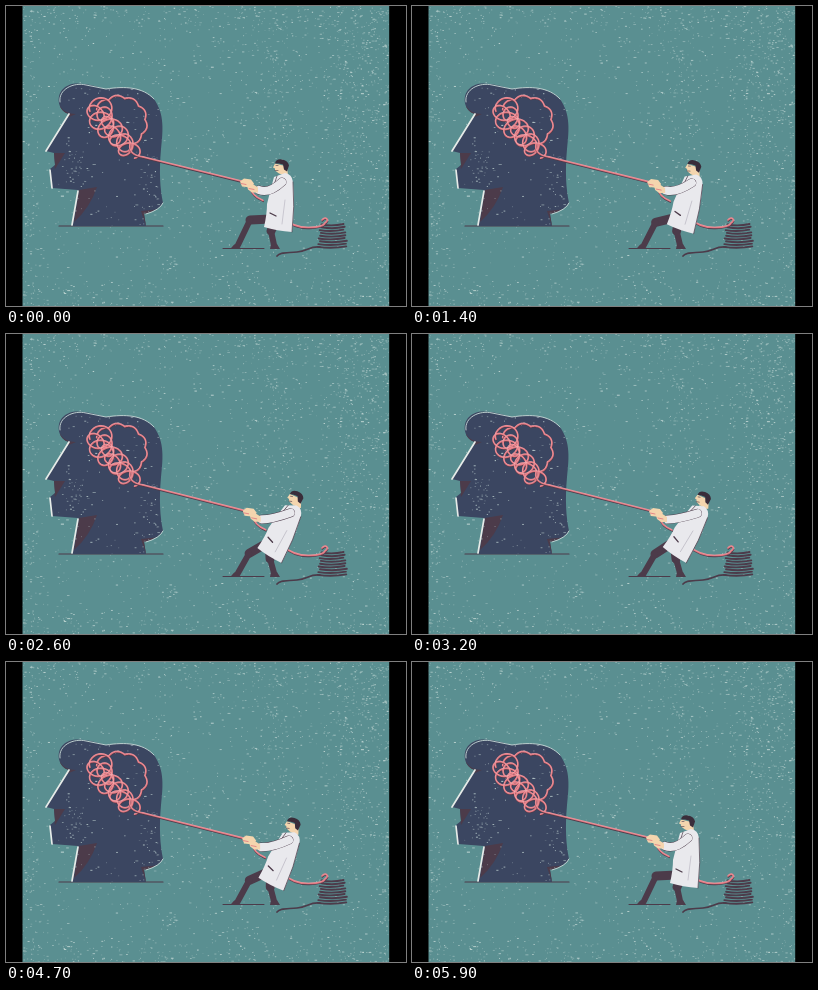
Recreate the animation shown at these times as an HTML page with a canvas. Size 400 px wide and 300 px high, loop 6000 ms.

```html
<!DOCTYPE html>
<html lang="en">
<head>
<meta charset="utf-8">
<title>Untangling</title>
<style>
html, body { margin: 0; width: 100%; height: 100%; overflow: hidden; background: #000; }
canvas { display: block; width: 400px; height: 300px; }
</style>
</head>
<body>
<canvas id="stage" width="400" height="300"></canvas>
<script>
const LOOP = 6000, STEP = 100, TILT = 0.42;
const TEAL = '#5a8f91', NAVY = '#3b4661', PLUM = '#4c3b4a', RED = '#e0747e',
      COAT = '#e9e9ed', SKIN = '#f4d5ae', CHALK = '#c9dcd9';
const stage = document.getElementById('stage').getContext('2d');
const scene = document.createElement('canvas');
scene.width = 400;
scene.height = 300;
const still = scene.getContext('2d');

let seed = 4127;
function rnd() {
  seed = (seed * 1664525 + 1013904223) >>> 0;
  return seed / 4294967296;
}
const near = (d, spread) => Math.exp(-d * d / (2 * spread * spread));

function fill(c, d, color) {
  c.fillStyle = color;
  c.fill(new Path2D(d));
}

function line(c, d, color, width) {
  c.strokeStyle = color;
  c.lineWidth = width;
  c.stroke(new Path2D(d));
}

function rope(c, d) {
  c.save();
  c.translate(0.3, 0.9);
  line(c, d, PLUM, 1.5);
  c.translate(-0.3, -0.9);
  line(c, d, RED, 1.7);
  c.translate(-0.2, -0.5);
  line(c, d, 'rgba(255,205,205,.6)', 0.6);
  c.restore();
}

// Worn print: short chalky dashes, denser in columns and along the edges
function wear(x, y) {
  const columns = 0.4 * near(x - 268, 13) * near(y - 70, 85)
                + 0.5 * near(x - 350, 20) * near(y - 60, 95);
  const edges = 0.45 * near(y, 13) + 0.4 * near(y - 300, 13)
              + 0.35 * near(x - 17, 9) + 0.55 * near(x - 383, 9);
  const blot = 0.7 * near(x - 165, 5) * near(y - 257, 5);
  return 0.1 + (columns + edges) * (0.7 + 0.3 * Math.sin(x * 0.8)) + blot;
}

function dash(c, x, y) {
  c.globalAlpha = 0.3 + rnd() * 0.6;
  c.fillRect(x, y, 0.6 + rnd() * rnd() * 2.6, 0.5 + rnd() * 0.6);
}

function backdrop(c) {
  c.fillStyle = TEAL;
  c.fillRect(0, 0, 400, 300);
  c.fillStyle = CHALK;
  for (let i = 0; i < 12500; i++) {
    const x = 16 + rnd() * 368, y = rnd() * 300;
    if (rnd() < wear(x, y)) dash(c, x, y);
  }
  for (let i = 0; i < 9; i++) dash(c, 197 + rnd() * 6, 152 + rnd() * 4);
  c.globalAlpha = 1;
}

function bust(c) {
  const skull = new Path2D(`M63 108C52 105 50 91 56 84C65 73 82 78 100 83
    C119 80 137 81 148 93C157 106 158 119 155 143C153 166 154 182 157 197
    Q154 204 138 208L140 220H66L72 184L46 182L44 163L49 159L48 147L40 145Z`);
  line(c, 'M53 220H157', PLUM, 1.2);
  c.fillStyle = NAVY;
  c.fill(skull);
  c.save();
  c.clip(skull);
  fill(c, 'M47 147H59L49 163Z', PLUM);
  fill(c, 'M73 184L91 181Q84 202 68 216Z', PLUM);
  fill(c, 'M54 100Q59 108 70 108L63 111L52 106Z', PLUM);
  fill(c, 'M155 203L135 205L140 220Z', PLUM);
  c.fillStyle = CHALK;
  for (let i = 0; i < 2600; i++) {
    const x = 40 + rnd() * 118, y = 78 + rnd() * 142;
    const worn = 0.05 + 0.6 * near(x - 69, 6) * near(y - 160, 9)
               + 0.16 * near(x - 150, 9) * near(y - 180, 28);
    if (rnd() < worn) dash(c, x, y);
  }
  c.restore();
  line(c, 'M54 96C52 83 68 76 80 79L100 83C119 80 137 81 148 93', CHALK, 0.9);
  line(c, 'M63 108L40 145M44 164L46 182M72 185L66 219', '#e6ebe8', 1.7);
  line(c, 'M157 197Q154 204 140 208', CHALK, 0.9);
}

// Polyline through n + 1 points given by a function of 0..1
function trace(n, point) {
  let d = '';
  for (let i = 0; i <= n; i++)
    d += (i ? 'L' : 'M') + point(i / n).map(v => v.toFixed(1)).join(' ');
  return d;
}

function tangle(c) {
  // Scalloped outline of the brain
  rope(c, trace(120, u => {
    const a = -2.6 + u * 3.75, bump = 2.5 * Math.abs(Math.sin(u * Math.PI * 6));
    return [113 + (26 + bump) * Math.cos(a), 116 + (24 + bump) * Math.sin(a)];
  }));
  // Loops wandering down to the taut end
  rope(c, trace(360, u => {
    const a = 2.6 + u * 68, r = 8.3 + 2.6 * Math.sin(u * 31);
    return [91 + 34 * u ** 1.35 + 4 * Math.sin(u * 40) + r * Math.cos(a),
            101 + 44 * u + r * Math.sin(a)];
  }));
  rope(c, 'M124 138Q122 149 137 151');
}

function coil(c) {
  for (let i = 0; i < 9; i++) {
    const y = 218.5 + i * 2.8, w = 11 + i * 0.4, x = 326.5 + Math.sin(i * 2.3);
    line(c, `M${x - w} ${y}Q${x} ${y + 2} ${x + w} ${y - 0.5}`, PLUM, 1.9);
  }
  line(c, 'M314 241C303 240 302 245 291 246S274 246 271 250', PLUM, 1.7);
  rope(c, 'M275 211Q288 222 303 221.5T319 217C324 214 320 210 316 214');
}

function head(c, k) {
  c.save();
  c.translate(275, 160.5);
  c.rotate(-0.25 * k);
  fill(c, 'M-6 -3L-8 1L-6 2L-6 4L-2 7L1 8L2 10L7 9L6 0Z', SKIN);
  fill(c, 'M-6 -3Q-5 -8 1 -7Q7 -6 8 -1L6 5L3 3L2 -2L-2 -3Z', '#3a2d3a');
  line(c, 'M-5 -1L-3 -1M-6 4L-3 4', PLUM, 0.6);
  c.restore();
}

function leg(c, hip, knee, foot) {
  line(c, `M${hip}L${knee}`, PLUM, 9);
  line(c, `M${knee}L${foot}`, PLUM, 6);
}

// The upper body turns about the waist; feet and rope stay put
function man(c, k) {
  const tilt = TILT * k, cos = Math.cos(tilt), sin = Math.sin(tilt);
  const turn = (x, y) => [273 + x * cos - y * sin, 200 + x * sin + y * cos];
  const hx = 241 + 3 * k, hy = 177.5 + 1.5 * k;

  line(c, 'M217 242.5H258', PLUM, 1);
  leg(c, turn(-8, 13), [244 - k, 214 + 6 * k], [232, 239]);
  leg(c, turn(-4, 16), [265 - k, 225], [268, 239]);
  fill(c, 'M229 238L236 243H225Q225 241 229 238M265 238L271 238L274 243H264Z', PLUM);

  c.save();
  c.translate(273, 200);
  c.rotate(tilt);
  c.translate(-273, -200);
  head(c, k);
  const coat = `M268 171L279 167Q286 168 287 176Q289 200 286 226
    Q271 225 258 221Q261 208 261 198L265 182Z`;
  fill(c, coat, COAT);
  line(c, 'M287 176Q289 200 286 226M271 170L267 182', PLUM, 0.7);
  line(c, 'M264 207L270 210', PLUM, 1.3);
  line(c, 'M279 194L276 218', '#a9a5b2', 0.5);
  c.restore();

  const shoulder = turn(3, -24), wrist = [hx + 12, hy + 6.5];
  const elbow = [263 + 4 * k, 188 - 3 * k];
  line(c, `M${shoulder}Q${elbow} ${wrist}`, PLUM, 9);
  line(c, `M${shoulder}Q${elbow} ${wrist}`, COAT, 8.2);

  rope(c, `M137 151L${hx} ${hy - 1}`);
  rope(c, `M${hx + 4} ${hy + 4}Q${hx + 4} ${hy + 12} ${hx + 16} ${hy + 17}`);
  c.save();
  c.translate(hx, hy);
  fill(c, 'M-7 -2L-3 -5L4 -4L7 0L4 4L-5 3Z', SKIN);
  fill(c, 'M0 2L5 0L11 4L11 9L5 9L1 6Z', SKIN);
  line(c, 'M-6 0L-1 1M2 5L7 6', RED, 0.8);
  c.restore();
}

const ease = u => (1 - Math.cos(Math.PI * Math.min(1, Math.max(0, u)))) / 2;
const lean = t => ease(t / 3300) - ease((t - 4000) / 1950);

function draw(t) {
  stage.drawImage(scene, 0, 0);
  man(stage, lean(t));
  stage.fillStyle = '#000';
  stage.fillRect(0, 0, 16.5, 300);
  stage.fillRect(383.2, 0, 17, 300);
}

for (const c of [stage, still]) c.lineCap = c.lineJoin = 'round';
backdrop(still);
bust(still);
tangle(still);
coil(still);

const start = performance.now();
function tick() {
  const t = (performance.now() - start) % LOOP;
  draw(Math.floor(t / STEP) * STEP);
  requestAnimationFrame(tick);
}
tick();
</script>
</body>
</html>
```
